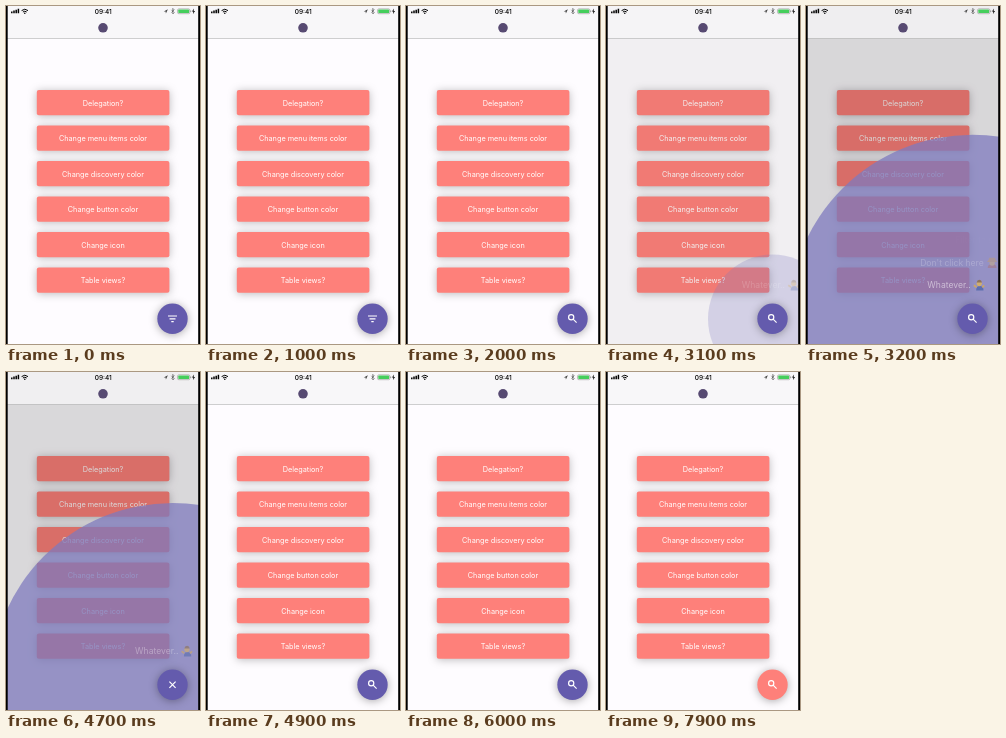
Recreate the animation shown at these times as an HTML page. Size 194 px wide and 338 px high, loop 8000 ms.

```html
<!DOCTYPE html>
<html lang="en">
<head>
<meta charset="utf-8">
<style>
  html, body { margin: 0; width: 100%; height: 100%; overflow: hidden; background: #fefcff; }
  svg { display: block; width: 194px; height: 338px; font-family: Inter, sans-serif; }
  .button rect { fill: #fe807a; filter: drop-shadow(0 1px 4px #0004); }
  .button text { fill: #fff; font-size: 7.3px; text-anchor: middle; }
  .item text { fill: #fff; font-size: 8.6px; text-anchor: end; }
  #fab { filter: drop-shadow(0 1px 4px #0005); }
  .icon { fill: none; stroke: #fff; stroke-width: 1.2; }
</style>
</head>
<body>
<svg viewBox="0 0 194 338">
  <rect width="194" height="338" fill="#fefcff"/>
  <g id="buttons"></g>
  <rect id="dim" width="194" height="338"/>
  <circle id="cover" cx="166.5" cy="313" fill="#7e7abe"/>

  <g class="item"><text x="157" y="237.4">Filter this</text>
    <ellipse cx="165.2" cy="234" rx="3.9" ry="4.7" fill="#c99a35"/>
    <path d="M161 239.4q0-4 4.2-4t4.2 4z" fill="#3f5f92"/>
    <circle cx="165" cy="233.6" r="2.2" fill="#eec04f"/></g>
  <g class="item"><text x="157" y="259.9">Don't click here</text>
    <path d="M161 262q0-4 4.4-4t4.4 4z" fill="#b8624a"/>
    <circle cx="165.4" cy="257" r="2.7" fill="#eec04f"/>
    <path d="M160.2 256q1.8-1 2.3-4.2h5.8q.5 3.2 2.3 4.2z" fill="#d9a23c"/></g>
  <g class="item"><text x="157" y="282.4">Whatever..</text>
    <path d="M162.5 284.4q0-4.4 3.7-4.4t3.7 4.4z" fill="#4a64a8"/>
    <path d="M160.2 279.3l2.8 2M170.6 279.3l-2 2" stroke="#dcae4a" stroke-width="1.7"/>
    <circle cx="165.6" cy="277.6" r="2.6" fill="#e5b850"/>
    <path d="M163 276.4q.4-2.6 2.7-2.6t2.6 2.6z" fill="#8a6a3a"/></g>

  <circle id="fab" cx="166.5" cy="312.7" r="15.2"/>
  <path id="filter" class="icon" d="M162 310h9M163.5 312.8h6M165.3 315.6h2.4"/>
  <g id="search" class="icon"><circle cx="165.2" cy="311.3" r="2.6"/><path d="M167.1 313.2l3.5 3.5"/></g>
  <path id="close" class="icon" d="M163.4 309.6l6.2 6.2m0-6.2l-6.2 6.2"/>

  <rect width="194" height="32" fill="#f8f7f9"/>
  <rect y="32" width="194" height=".7" fill="#bbb"/>
  <rect id="navDim" width="194" height="32"/>
  <circle cx="97" cy="21.8" r="4.8" fill="#574a72"/>
  <path d="M5.8 7.3v-1.8M8 7.3v-2.7M10.2 7.3v-3.6M12.4 7.3v-4.5" stroke="#000" stroke-width="1.5"/>
  <g fill="none" stroke="#000"><path d="M15.6 4.6q3.2-2.8 6.4 0M16.9 6q1.9-1.6 3.8 0"/></g>
  <circle cx="18.8" cy="7.2" r=".8"/>
  <text x="97.3" y="7.6" font-size="6.5" font-weight="500" text-anchor="middle">09:41</text>
  <path d="M157.7 5.4l4.2-2.2-2 4.3-.3-2z" fill="#444"/>
  <path d="M165.4 3.8l2.8 2.8-1.4 1.4V2.4l1.4 1.4-2.8 2.8" fill="none" stroke="#444" stroke-width=".6"/>
  <rect x="171.6" y="2.9" width="12.2" height="4.8" rx="1.2" fill="#fff" stroke="#777" stroke-width=".5"/>
  <rect x="172.3" y="3.5" width="10.8" height="3.6" rx=".7" fill="#45ce5c"/>
  <path d="M184.7 4.6v1.4" stroke="#777" stroke-width=".7"/>
  <path d="M188 2.5l-2 3h1.4l-.4 2.5 2-3h-1.4z"/>
  <rect width="1.7" height="338"/>
  <rect x="192.2" width="1.8" height="338"/>
</svg>
<script>
  const LOOP = 8000;
  const $ = id => document.getElementById(id);
  const labels = ['Delegation?', 'Change menu items color', 'Change discovery color',
    'Change button color', 'Change icon', 'Table views?'];
  $('buttons').innerHTML = labels.map((label, i) =>
    `<g class="button" transform="translate(0 ${i * 35.5})">
      <rect x="30.8" y="84.1" width="132.6" height="25.2" rx="2"/>
      <text x="97" y="99.7">${label}</text></g>`).join('');

  const items = [...document.querySelectorAll('.item')];
  const openAt = [3180, 3090, 3000], closeAt = [4540, 4580, 4640];

  const ease = (t, start, length) => {
    const k = Math.min(1, Math.max(0, (t - start) / length));
    return k * k * (3 - 2 * k);
  };
  const show = (id, on) => $(id).style.display = on ? '' : 'none';

  function draw(t) {
    const open = ease(t, 3001, 300) - ease(t, 4599, 300);
    $('cover').setAttribute('r', 248.7 * open);
    $('cover').setAttribute('opacity', open);
    $('dim').setAttribute('opacity', 0.2 * open);
    $('navDim').setAttribute('opacity', 0.045 * open);

    const focus = ease(t, 3600, 150);
    items.forEach((item, i) => {
      const shown = ease(t, openAt[i], 300) - ease(t, closeAt[i], 120);
      item.setAttribute('transform', `translate(${30 * (1 - shown)} 0)`);
      item.setAttribute('opacity', shown);
      item.firstElementChild.setAttribute('opacity', i === 1 ? 0.7 + 0.3 * focus : 0.7);
    });

    const closing = t >= 3250 && t < 4800;
    show('filter', t < 1100);
    show('search', t >= 1100 && !closing);
    show('close', closing);
    $('fab').setAttribute('fill', t < 6700 ? '#645bad' : '#fe807a');
  }

  function tick() {
    draw(performance.now() % LOOP);
    requestAnimationFrame(tick);
  }
  tick();
</script>
</body>
</html>
```
